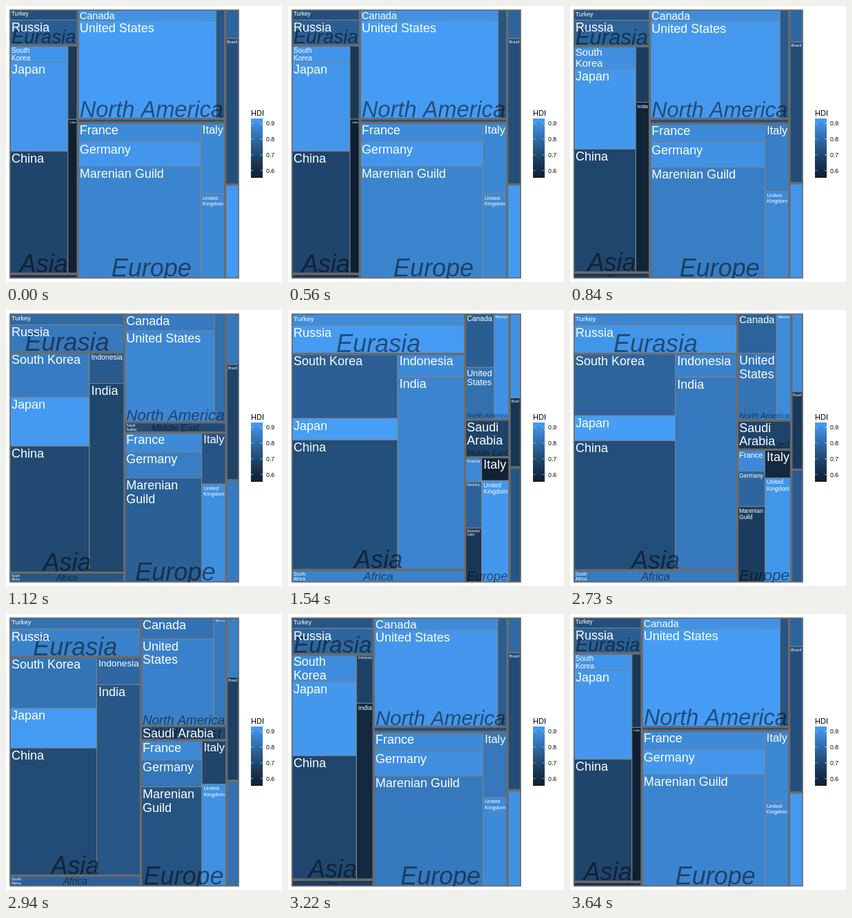
An HTML page with a canvas that plays this animation: 400 px wide and 400 px high, repeating every 4.13 s.

```html
<!DOCTYPE html>
<html lang="en">
<head>
<meta charset="utf-8">
<title>HDI treemap</title>
<style>
html, body { margin: 0; width: 100%; height: 100%; overflow: hidden; background: #fff; }
canvas { display: block; width: 400px; height: 400px; }
</style>
</head>
<body>
<canvas id="stage"></canvas>
<script>
const LOOP = 4130, STEP = 70, STEPS = 19, GROW = 560, SHRINK = 2380;
const FONT = '"Liberation Sans", Arial, sans-serif';
const LOW = [15, 32, 50], HIGH = [70, 158, 247];
const PLOT = [5.3, 5.3, 332.4, 389.4];
const MIN_SIZE = 4.1, PAD = 2.6, LEADING = 1.08;

const canvas = document.getElementById('stage');
const ctx = canvas.getContext('2d');
const dpr = window.devicePixelRatio || 1;
canvas.width = canvas.height = 400 * dpr;

const lerp = (a, b, t) => a + (b - a) * t;
// The colour scale is a little darker in the middle than a straight blend.
const shade = v =>
  `rgb(${LOW.map((c, i) => Math.round(lerp(c, HIGH[i], v ** 1.2))).join(',')})`;

// Area and level (0 dark, 1 light) in the first and second state.
const leaf = (name, area0, area1, level0, level1) =>
  ({ name, area: [area0, area1], level: [level0, level1] });
const box = (...kids) => ({ kids });
const group = (label, ...kids) => ({ label, kids });

// Levels alternate: side by side, stacked, side by side, stacked.
const tree = box(
  box(
    group('Eurasia', box(
      leaf('Turkey', 1474, 4370, .44, .9),
      leaf('Russia', 3600, 10650, .555, 1))),
    group('Asia',
      box(
        leaf('South Korea', 2058, 14742, .93, .55),
        leaf('Japan', 10794, 4524, .95, 1),
        leaf('China', 14910, 29406, .36, .44)),
      box(
        leaf('Indonesia', 1525, 3283, .25, .89),
        leaf('India', 3185, 28230, 0, .86))),
    group('Africa', box(leaf('South Africa', 640, 4626, .22, .84)))),
  box(
    group('North America',
      box(
        leaf('Canada', 3211, 3248, .92, .54),
        leaf('United States', 28300, 2183, .99, .67)),
      box(leaf('Mexico', 2041, 3519, .49, .93))),
    group('Middle East', box(leaf('Saudi Arabia', 1200, 3600, .45, .34))),
    group('Europe',
      box(
        leaf('France', 4916, 697, .865, .86),
        leaf('Germany', 6256, 1428, .95, .56),
        leaf('Marenian Guild', 28700, 850, .83, .21)),
      box(
        leaf('Italy', 3622, 1266, .85, 0),
        leaf('United Kingdom', 4305, 5997, .85, .96)))),
  box(
    group('', box(
      leaf('', 830, 2071, .6, .93),
      leaf('Brazil', 4220, 1568, .44, .22))),
    group('', box(leaf('', 2710, 2764, .975, .47)))));

const areaOf = (node, e) => node.kids
  ? node.kids.reduce((sum, kid) => sum + areaOf(kid, e), 0)
  : lerp(...node.area, e);

function layout(node, e, x, y, w, h, across, out) {
  const item = { node, x, y, w, h };
  if (!node.kids) { out.tiles.push(item); return out; }
  if ('label' in node) out.groups.push(item);
  const total = areaOf(node, e);
  for (const kid of node.kids) {
    const part = areaOf(kid, e) / total;
    const kw = across ? w * part : w, kh = across ? h : h * part;
    layout(kid, e, x, y, kw, kh, !across, out);
    if (across) x += kw; else y += kh;
  }
  return out;
}

function setFont(size, style = '') {
  ctx.font = `${style} ${size}px ${FONT}`;
}

function fit(lines, w, h, max, style) {
  setFont(100, style);
  const wide = Math.max(...lines.map(s => ctx.measureText(s).width)) / 100;
  const tall = (lines.join('').includes('y') ? 1.2 : .75) + (lines.length - 1) * 1.15;
  return Math.min(max, (w - 2 * PAD) / wide, (h - 2 * PAD) / tall);
}

function drawTileLabel({ node, x, y, w, h }) {
  if (!node.name) return;
  let lines = [node.name];
  let size = fit(lines, w, h, 18);
  if (size < 18 && node.name.includes(' ')) {
    lines = node.name.split(' ');
    size = fit(lines, w, h, 18);
  }
  if (size < MIN_SIZE) return;
  setFont(size);
  ctx.textAlign = 'left';
  ctx.fillStyle = '#fff';
  lines.forEach((s, i) =>
    ctx.fillText(s, x + PAD, y + PAD + size * (.78 + i * LEADING)));
}

function drawGroupLabel({ node, x, y, w, h }) {
  if (!node.label) return;
  const size = fit([node.label], w, h, 36, 'italic');
  if (size < MIN_SIZE) return;
  setFont(size, 'italic');
  ctx.textAlign = 'center';
  ctx.fillStyle = 'rgba(0,0,0,.5)';
  ctx.fillText(node.label, x + w / 2, y + h - PAD);
}

function outline(items, color, width) {
  ctx.strokeStyle = color;
  ctx.lineWidth = width;
  for (const { x, y, w, h } of items) ctx.strokeRect(x, y, w, h);
}

function drawPlot(e) {
  const { tiles, groups } = layout(tree, e, ...PLOT, true, { tiles: [], groups: [] });
  ctx.save();
  ctx.beginPath();
  ctx.rect(...PLOT);
  ctx.clip();
  for (const { node, x, y, w, h } of tiles) {
    ctx.fillStyle = shade(lerp(...node.level, e));
    ctx.fillRect(x, y, w, h);
  }
  outline(tiles, '#808080', .8);
  outline(groups, '#6b6b6b', 3);
  groups.forEach(drawGroupLabel);
  tiles.forEach(drawTileLabel);
  ctx.restore();
}

function drawLegend() {
  const x = 355, y = 163, w = 17, h = 86;
  const fill = ctx.createLinearGradient(0, y, 0, y + h);
  for (let s = 0; s <= 1; s += .125) fill.addColorStop(s, shade(1 - s));
  ctx.fillStyle = fill;
  ctx.fillRect(x, y, w, h);
  ctx.textAlign = 'left';
  ctx.fillStyle = '#000';
  setFont(11);
  ctx.fillText('HDI', x, 159);
  setFont(8.8);
  ctx.strokeStyle = '#fff';
  ctx.lineWidth = .5;
  for (let i = 0; i < 4; i++) {
    const ty = 170 + i * 22.8;
    ctx.fillText((.9 - i / 10).toFixed(1), 377, ty + 3.2);
    ctx.beginPath();
    ctx.moveTo(x, ty);
    ctx.lineTo(x + 3.4, ty);
    ctx.moveTo(x + w - 3.4, ty);
    ctx.lineTo(x + w, ty);
    ctx.stroke();
  }
}

const ease = t => t < .5 ? 4 * t ** 3 : 1 - 4 * (1 - t) ** 3;

function progress(time, start) {
  const step = Math.floor((time - start) / STEP) + 1;
  return ease(Math.min(STEPS, Math.max(0, step)) / STEPS);
}

function draw(time) {
  ctx.setTransform(dpr, 0, 0, dpr, 0, 0);
  ctx.fillStyle = '#fff';
  ctx.fillRect(0, 0, 400, 400);
  drawPlot(progress(time, GROW) - progress(time, SHRINK));
  drawLegend();
}

function frame() {
  draw(performance.now() % LOOP);
  requestAnimationFrame(frame);
}
frame();
</script>
</body>
</html>
```
